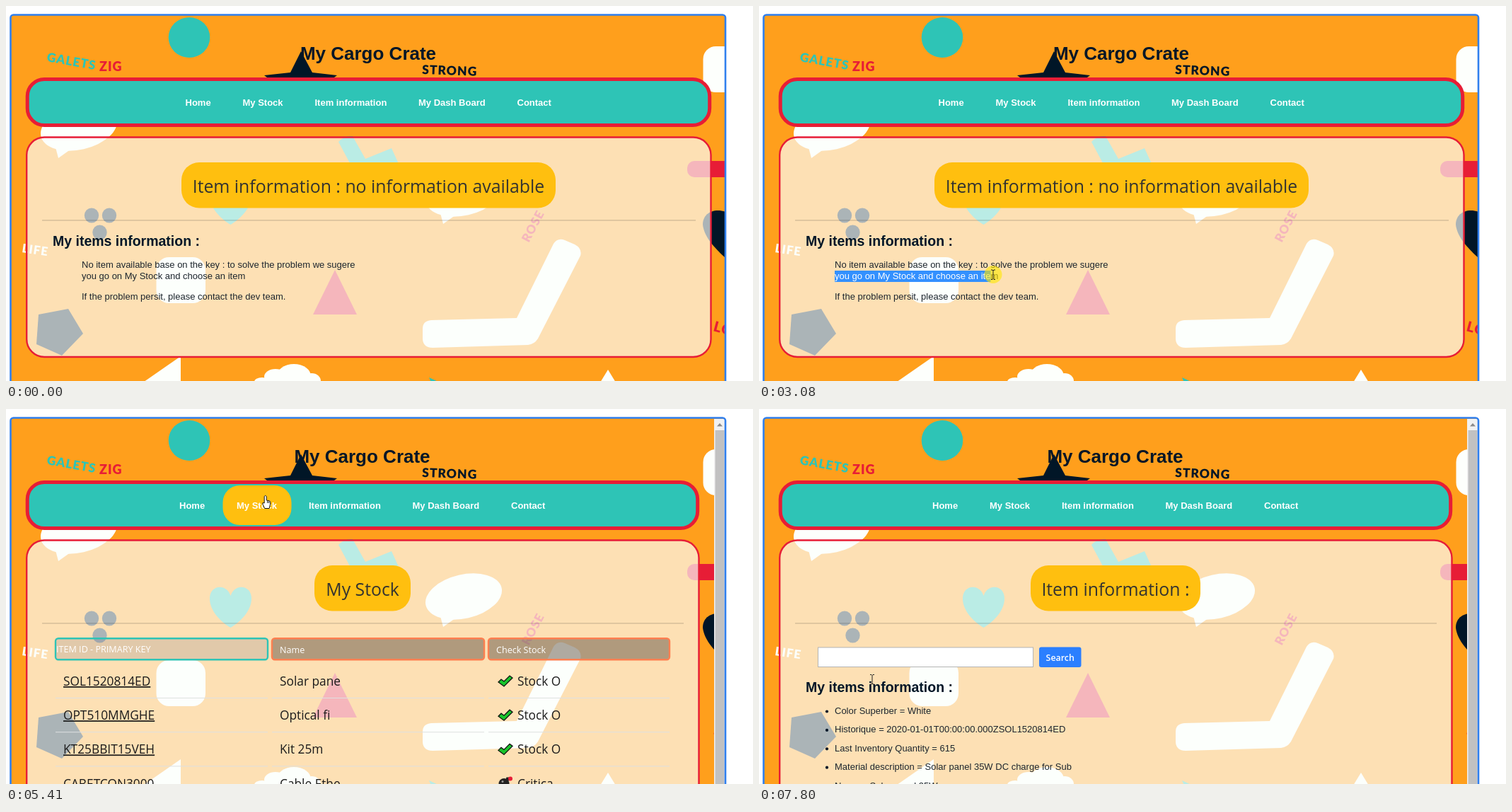
Animation of 1056 by 530 pixels, one loop 8000 ms. Source, as an HTML page:

```html
<!DOCTYPE html>
<html lang="en">
<head>
<meta charset="utf-8">
<title>Stock demo</title>
<style>
html, body { margin: 0; width: 100%; height: 100%; overflow: hidden; background: #fff; }
svg { display: block; }
text { font: 13px "Liberation Sans", Arial, sans-serif; fill: #1d262e; white-space: pre; }
.ui { font-family: "Open Sans", "Noto Sans", sans-serif; }
.bold { font-weight: 700; }
.white { fill: #fff; }
.mid { text-anchor: middle; }
.banner { font-size: 24.8px; fill: #343330; }
.head { font-size: 12.6px; fill: #fff; }
.cell { font-size: 17.3px; fill: #1b1b1b; }
.link { text-decoration: underline; }
.link.hover { fill: #0056b3; }
.deco { font: 900 17px Lato, "Open Sans", sans-serif; letter-spacing: 1px; }
</style>
</head>
<body>
<svg id="stage" width="1056" height="530" viewBox="0 0 1056 530"></svg>
<script>
const TEAL = '#2ec4b6', RED = '#e71d36', INK = '#011627', PAPER = '#fdfffc', AMBER = '#ffbf0f';
const LOOP = 8000, START = 520, TICK = 77.42;

const rect = (x, y, w, h, r, fill, more = '') =>
  `<rect x="${x}" y="${y}" width="${w}" height="${h}" rx="${r}" fill="${fill}" ${more}/>`;
const path = (d, fill, more = '') => `<path d="${d}" fill="${fill}" ${more}/>`;
const oval = (x, y, rx, ry, fill, more = '') =>
  `<ellipse cx="${x}" cy="${y}" rx="${rx}" ry="${ry}" fill="${fill}" ${more}/>`;
const text = (x, y, str, cls = '', more = '') => `<text x="${x}" y="${y}" class="${cls}" ${more}>${str}</text>`;
const deco = (x, y, angle, str, fill, size = 17) =>
  text(x, y, str, 'deco', `transform="rotate(${angle} ${x} ${y})" style="fill:${fill};font-size:${size}px"`);
const bubble = (x, y) =>
  oval(x, y, 55, 31, PAPER, `transform="rotate(-13 ${x} ${y})"`) +
  path(`M${x - 34} ${y + 24}L${x - 29} ${y + 43}L${x - 8} ${y + 28}Z`, PAPER);

function backdrop() {
  return rect(7, 13, 1010, 530, 0, '#ff9f1c') +
    oval(259, 44.5, 29.3, 28.5, TEAL) +
    path('M417 64L433 94L468 98L440 118H392L365 98L402 94Z', INK) +
    rect(985.5, 57, 70, 65, 18, PAPER) +
    bubble(103, 172) + bubble(647, 265) +
    deco(57, 78, 10, 'GALETS', TEAL, 17.5) + deco(132, 92, 0, 'ZIG', RED, 18) +
    deco(588, 96, 2, 'STRONG', INK, 17.5) +
    deco(22, 348, 8, 'LIFE', PAPER) + deco(739, 335, -62, 'ROSE', RED) +
    deco(999, 459, 15, 'LOVE', RED, 20) +
    path('M470 192Q478 183 490 184L508 216L545 201L556 225L500 248Z', TEAL) +
    path('M317.500 309C302 300 288 284 288 268C288 248 312 246 317.500 264C323 246 347 248 347 268C347 284 333 300 317.500 309Z', TEAL) +
    path('M1018 291C1000 285 985 293 985 309C987 328 1005 345 1018 357Z', INK) +
    [[121, 296], [146, 296], [132.5, 320]].map(([x, y]) => oval(x, y, 10.2, 10.6, INK)).join('') +
    path('M46 436L88 428L109 463L79 494L43 478Z', INK) +
    rect(212.500, 355, 69.500, 65, 18, PAPER) +
    path('M465 373L496 436H434Z', RED) +
    path('M601 444L722 441L774 336Q780 327 790 331L804 337Q815 343 812 353L752 470Q747 478 738 479L603 483Q590 483 589 471V456Q589 445 601 444Z', PAPER) +
    rect(963, 219, 80, 23, 10, RED) +
    path('M247 495V545H175Z', PAPER) +
    oval(407, 523, 24, 17, PAPER) + oval(381, 524, 16, 11, PAPER) +
    oval(432, 530, 13, 11, PAPER) + oval(362, 531, 11, 6, PAPER) +
    path('M598 525L613 532H601Z', TEAL) + path('M851 514L862 532H840Z', PAPER);
}

// Page chrome; shift is the width lost to the scrollbar.
function page(id, banner, bannerWidth, shift, body) {
  const mid = 512.5 - shift / 2;
  const nav = [['Home', 253.5], ['My Stock', 334.5], ['Item information', 436.5], ['My Dash Board', 583], ['Contact', 722.5]];
  const scrollbar = rect(1001, 14, 15, 530, 0, '#f1f1f1') + rect(1002.500, 30, 13, 500, 0, '#c1c1c1') +
    path('M1005 24.500L1009 20L1013 24.500Z', '#8a8a8a');
  return `<g id="${id}">` +
    rect(29.2, 185.5, 967.3 - shift, shift ? 420 : 310.5, 25, PAPER, `fill-opacity=".68" stroke="${RED}" stroke-width="2.4"`) +
    text(mid - .5, 75.5, 'My Cargo Crate', 'bold mid', `style="font-size:26px;fill:${INK}"`) +
    rect(30.2, 103.5, 964.5 - shift, 65, 24, TEAL, `stroke="${RED}" stroke-width="5"`) +
    rect(315 - shift / 2, 108, 97, 56, 24, AMBER, 'class="pill"') +
    nav.map(([s, x]) => text(x - shift / 2, 140.5, s, 'bold white')).join('') +
    rect(mid - bannerWidth / 2, 221, bannerWidth, 64.5, 25, AMBER) +
    text(mid, 264, banner, 'ui mid banner') +
    rect(51, 302, 924 - shift, 1.8, 0, '#000', 'fill-opacity=".13"') +
    body + (shift ? scrollbar : '') + '</g>';
}

const heading = y => text(66, y, 'My items information :', 'bold', `style="font-size:19.5px;fill:${INK}"`);

function emptyBody() {
  const line = 'you go on My Stock and choose an item';
  return heading(339) +
    text(107, 370, 'No item available base on the key : to solve the problem we sugere') +
    text(107, 386, line, '', 'id="line"') +
    text(107, 415, 'If the problem persit, please contact the dev team.') +
    '<clipPath id="selClip"><rect id="selBox" x="107" y="374" width="0" height="16"/></clipPath>' +
    `<g clip-path="url(#selClip)">${rect(107, 374, 240, 16, 0, '#3390ff')}${text(107, 386, line, 'white')}</g>`;
}

function tableBody() {
  const columns = [[70, 300], [376, 300], [682, 256]];
  const rows = [['SOL1520814ED', 'Solar pane', 'Stock O'], ['OPT510MMGHE', 'Optical fi', 'Stock O'],
    ['KT25BBIT15VEH', 'Kit 25m', 'Stock O'], ['CABETCON3000', 'Cable Ethe', 'Critica']];
  const tick = y => path(`M696 ${y - 5}L700 ${y - 9}L704 ${y - 6}L712 ${y - 14}L716 ${y - 11}L704 ${y + 1}Z`, '#18c52b', 'stroke="#111" stroke-width="1.3"');
  const bomb = y => oval(704, y - 6, 7.5, 7.5, '#222') + rect(707, y - 15, 5, 5, 1, '#222') +
    oval(713, y - 13, 3, 3, RED) + oval(702, y - 9, 1.5, 1.5, '#999');
  const heads = columns.map(([x, w], i) => rect(x, 324.2, w, 30, 4, i ? '#645748' : '#6e6e82',
    `fill-opacity="${i ? .5 : .2}" stroke="${i ? '#ff7f50' : TEAL}" stroke-width="2.4"`)).join('');
  return heads + text(71, 344, 'ITEM ID - PRIMARY KEY', 'ui head') +
    text(387, 344.5, 'Name', 'ui head') + text(693, 344.5, 'Check Stock', 'ui head') +
    rows.map(([id, name, stock], i) => {
      const y = 391 + i * 48.2;
      return text(81, y, id, 'ui cell link') + text(387, y, name, 'ui cell') + text(723, y, stock, 'ui cell') +
        (i < 3 ? tick(y) : bomb(y)) +
        columns.map(([x, w]) => rect(x, y + 17, w, 1, 0, '#dee0e0')).join('');
    }).join('');
}

function itemBody() {
  const items = ['Color Superber = White', 'Historique = 2020-01-01T00:00:00.000ZSOL1520814ED',
    'Last Inventory Quantity = 615', 'Material description = Solar panel 35W DC charge for Sub', 'Name = Solar panel 35W'];
  return rect(83.5, 337, 304, 27.5, 0, '#fff', 'stroke="#b4b4b4"') +
    rect(396, 336.5, 59.5, 28.5, 3, '#2b7fff') +
    text(425.7, 356, 'Search', 'ui white mid', 'style="font-size:12.4px;font-weight:600"') + heading(400) +
    items.map((s, i) => oval(96, 427.5 + i * 26.4, 2.1, 2.1, INK) + text(107, 431 + i * 26.4, s)).join('');
}

const outline = 'stroke="#111" stroke-width="1" stroke-linejoin="round"';
const cursors = `<circle id="click" r="12.5" fill="#ffe800"/>
  <g id="arrow">${path('M0 0V14L3.300 11L5.500 16L7.800 15L5.600 10.200H10Z', '#fff', outline)}</g>
  <g id="hand">${path('M.500 1.500Q2 -.800 3.500 1.500V7L8 8Q9.500 8.500 9 12L7.500 18.500H1L-2 12Q-2.500 9.500 .500 11Z', '#fff', outline)}${path('M5 8V11M7 8.500V11', 'none', outline)}</g>
  <g id="beam">${path('M-3 -6.500H-1L0 -5.500L1 -6.500H3M0 -5.500V6M-3 7H-1L0 6L1 7H3', 'none', 'stroke="#222"')}</g>`;

document.getElementById('stage').innerHTML =
  '<clipPath id="view"><rect x="7" y="13" width="1010" height="530"/></clipPath><g clip-path="url(#view)">' +
  backdrop() +
  page('empty', 'Item information : no information available', 529, 0, emptyBody()) +
  page('table', 'My Stock', 136, 17, tableBody()) +
  page('item', 'Item information :', 240, 17, itemBody()) + '</g>' +
  rect(6.5, 12.5, 1010.5, 600, 4, 'none', 'stroke="#2f7fee" stroke-width="2.6"') + cursors;

const $ = id => document.getElementById(id);
const show = (el, on) => { el.style.display = on ? '' : 'none'; };
const pills = [...document.querySelectorAll('.pill')];
const links = [...document.querySelectorAll('.link')];

const track = [[0, 448, 512], [2, 390, 492], [5, 283, 466], [7, 283, 466], [11, 200, 430], [18, 107, 399],
  [19, 107, 399], [24, 102, 384], [26, 102.5, 379.5], [27, 125, 379.5], [30, 272.5, 379.5], [33, 331, 379.5],
  [35, 333.7, 379.5], [45, 333.7, 379.5], [49, 264, 270], [51, 270, 190], [53, 335, 140], [54, 369, 123],
  [55, 369, 123], [56, 364.7, 122], [65, 364.7, 122], [71, 298, 169], [74, 235, 360], [76, 207, 443],
  [77, 223, 448], [79, 162, 395], [80, 160, 380], [81, 160, 369], [82, 160, 382], [200, 160, 382]];
const kinds = [[-9, ''], [0, 'arrow'], [26, 'beam'], [47, 'arrow'], [53, 'hand'], [70, 'arrow'],
  [76, 'hand'], [77, 'arrow'], [80, 'hand'], [94, 'beam']];
const clicks = [[-9, 0], [26, .6], [41, .3], [42, 0], [57, .3], [58, .6], [60, 0], [86, .6], [87, 0]];
const pages = [[-9, 'empty'], [63, 'table'], [89, 'item']];

const at = (list, k) => list.filter(e => e[0] <= k).pop()[1];

function position(k) {
  const i = Math.max(1, track.findIndex(e => e[0] > k));
  const [a, ax, ay] = track[i - 1], [b, bx, by] = track[i];
  const f = Math.max(0, (k - a) / (b - a));
  return [ax + (bx - ax) * f, ay + (by - ay) * f];
}

// Snap the selection to the nearest letter edge.
function selectionEnd(x) {
  const line = $('line');
  let best = 107;
  for (let i = 0; i < line.getNumberOfChars(); i++) {
    const edge = line.getEndPositionOfChar(i).x;
    if (Math.abs(edge - x) < Math.abs(best - x)) best = edge;
  }
  return best;
}

function draw(ms) {
  const k = Math.floor((ms % LOOP - START) / TICK);
  const [x, y] = position(k), kind = at(kinds, k), current = at(pages, k);
  for (const id of ['empty', 'table', 'item']) show($(id), id === current);
  if (current === 'empty') {
    $('selBox').setAttribute('width', k < 27 ? 0 : selectionEnd(k < 35 ? x : 340) - 107);
  }
  for (const pill of pills) show(pill, k >= 53 && k < 70);
  links.forEach((link, i) => link.classList.toggle('hover', kind === 'hand' && (i === 0 ? k >= 80 : i === 1 && k === 76)));
  for (const id of ['arrow', 'hand', 'beam']) {
    show($(id), id === kind);
    $(id).setAttribute('transform', `translate(${x} ${y})`);
  }
  $('click').setAttribute('transform', `translate(${x} ${y})`);
  $('click').setAttribute('opacity', at(clicks, k));
}

const begin = performance.now();
function frame() {
  draw(performance.now() - begin);
  requestAnimationFrame(frame);
}
frame();
</script>
</body>
</html>
```
